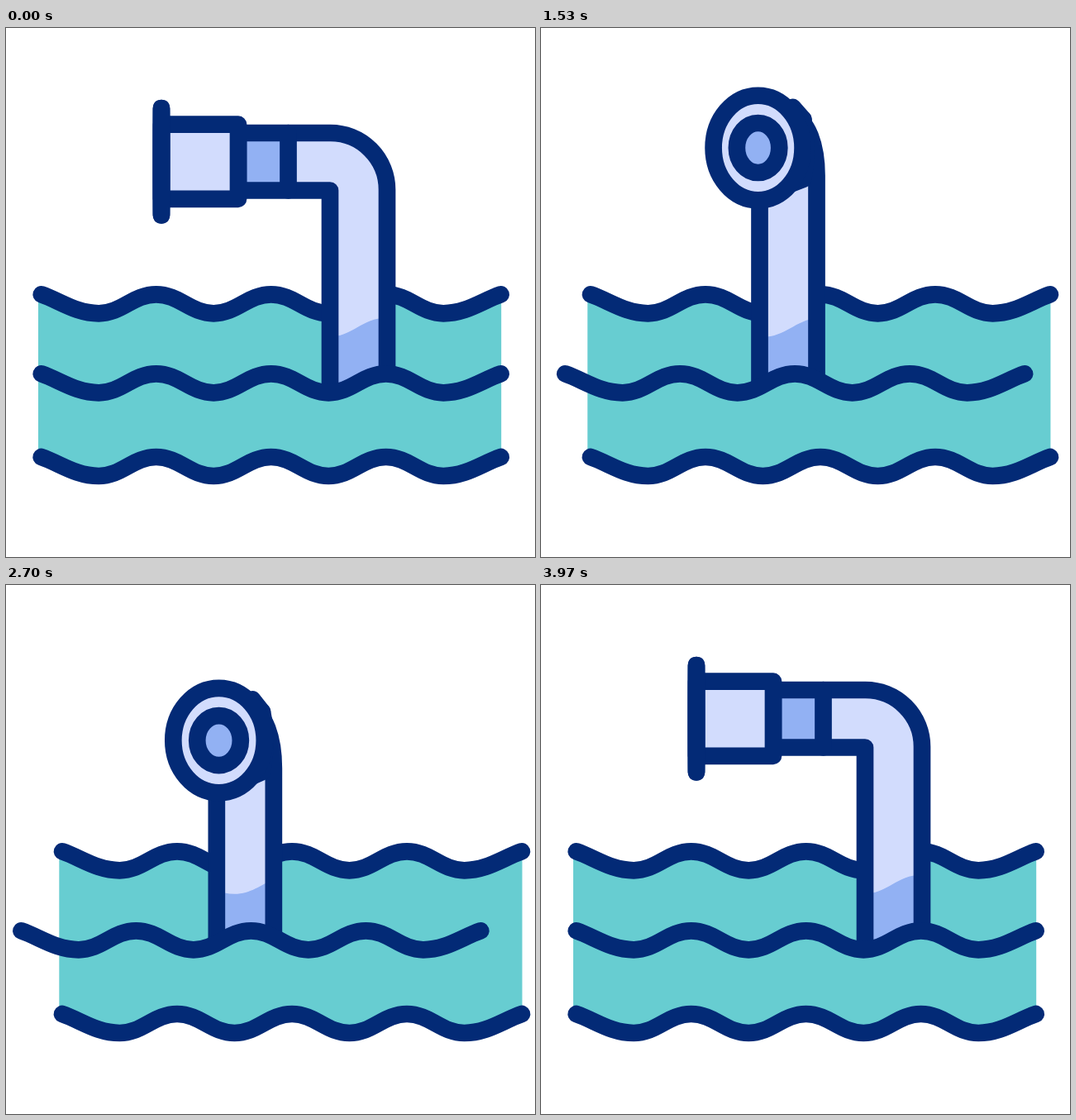
Animation, 640 px wide and 640 px high, one loop 4 s. Source, as an HTML page with a canvas:

```html
<!DOCTYPE html>
<html lang="en">
<head>
<meta charset="utf-8">
<title>Periscope</title>
<style>
  html, body { margin: 0; width: 100%; height: 100%; overflow: hidden; background: #fff; }
  canvas { display: block; width: 640px; height: 640px; }
</style>
</head>
<body>
<canvas id="stage" width="640" height="640"></canvas>
<script>
const ctx = document.getElementById('stage').getContext('2d');
const NAVY = '#032a76', PALE = '#d2dcfd', BLUE = '#92b1f3', TEAL = '#67cdd1';
const LAST = 119;

const smooth = p => p * p * (3 - 2 * p);
const easeOut = p => 1 - (1 - p) ** 2;
const easeIn = p => p ** 2.2;
const mix = (a, b, p) => a + (b - a) * p;

// Each key is [frame, value, easing towards the next key].
function track(keys, f) {
  let i = 0;
  while (i < keys.length - 2 && f >= keys[i + 1][0]) i++;
  const [f0, v0, ease = smooth] = keys[i];
  const [f1, v1] = keys[i + 1];
  const p = Math.min(1, Math.max(0, (f - f0) / (f1 - f0)));
  return mix(v0, v1, ease(p));
}

const BACK = [[0, 0], [20, -13], [40, 25.6], [60, -13], [80, 25.6], [100, -13], [LAST, 0]];
const FRONT = [[0, 0], [20, 27], [40, -24.7], [60, 27], [80, -24.7], [100, 27], [LAST, 0]];
const SCOPE_X = [[0, 0, easeOut], [20, -50.5], [40, -126.8], [80, -138], [100, -22.5, easeIn], [LAST, 0]];
const SCOPE_Y = [[0, 0, easeOut], [20, 19.5], [40, -19.5], [80, 26.7], [100, -19.7, easeIn], [LAST, 0]];
const TURN = [[0, 0], [30, 0], [51, 1], [76.5, 1], [97, 0], [LAST, 0]];

// Appends a wave running right (dir 1) or left (dir -1) from the point x, y.
function wave(path, x, y, dir = 1) {
  const half = 69.5, drop = 23;
  const curve = (a, ya, b, yb, y1) => {
    path.bezierCurveTo(x + dir * a, y + ya, x + dir * b, y + yb, x + dir * half, y + y1);
    x += dir * half;
  };
  curve(23, 8, 42, drop, drop);
  for (let i = 0; i < 3; i++) {
    curve(28, drop, 41.5, 0, 0);
    curve(28, 0, 41.5, drop, drop);
  }
  curve(27.5, drop, 46.5, 8, 0);
}

function waveLine(dx, y) {
  const path = new Path2D();
  path.moveTo(42.7 + dx, y);
  wave(path, 42.7 + dx, y);
  return path;
}

function paint(path, fill, line = true) {
  if (fill) {
    ctx.fillStyle = fill;
    ctx.fill(path);
  }
  if (line) {
    ctx.strokeStyle = NAVY;
    ctx.stroke(path);
  }
}

function water(dx) {
  const body = new Path2D();
  body.moveTo(39 + dx, 322.3);
  body.lineTo(42.7 + dx, 322.3);
  wave(body, 42.7 + dx, 322.3);
  body.lineTo(599.2 + dx, 322.3);
  body.lineTo(599.2 + dx, 519);
  body.lineTo(598.7 + dx, 519);
  wave(body, 598.7 + dx, 519, -1);
  body.lineTo(39 + dx, 519);
  paint(body, TEAL, false);
  paint(waveLine(dx, 322.3));
  paint(waveLine(dx, 519));
}

// A barrel section whose right rim bulges as it turns.
function section(left, top0, bottom0, right, top1, bottom1, bulge, fill) {
  const path = new Path2D();
  path.moveTo(left, top0);
  path.lineTo(right, top1);
  path.quadraticCurveTo(right + bulge, 162, right, bottom1);
  path.lineTo(left, bottom0);
  path.closePath();
  paint(path, fill);
}

function pipe(joint, bend) {
  const path = new Path2D();
  path.moveTo(joint, 127);
  path.lineTo(bend, 127);
  path.ellipse(bend, 195.5, 461 - bend, 68.5, 0, -Math.PI / 2, 0);
  path.lineTo(461, 500);
  path.lineTo(392, 500);
  path.lineTo(392, 196.5);
  path.lineTo(joint, 196.5);
  return path;
}

function ring(x, rx, ry, fill) {
  const path = new Path2D();
  path.ellipse(x, 161.7, Math.max(rx, 0.3), ry, 0, 0, 2 * Math.PI);
  paint(path, fill);
  if (rx < 10.4) {
    const edge = new Path2D();
    edge.moveTo(x, 161.7 - ry);
    edge.lineTo(x, 161.7 + ry);
    paint(edge);
  }
}

function scope(x, y, turn, back) {
  const joint = mix(341.5, 462, turn);
  const rim = mix(281, 457, turn);
  const lens = mix(188, 423.8, turn);
  const tube = pipe(joint, mix(392.5, 441, turn));

  ctx.save();
  ctx.translate(x, y);
  paint(tube, PALE, false);

  ctx.save();
  ctx.clip(tube);
  ctx.translate(-x, -y);
  const tint = waveLine(back, 350.8);
  tint.lineTo(640, 640);
  tint.lineTo(0, 640);
  paint(tint, BLUE, false);
  ctx.restore();

  paint(tube);
  section(rim, mix(127, 110, turn), mix(196.5, 206, turn),
    joint, 127, mix(196.5, 200, turn), 8 * turn, BLUE);
  section(lens, mix(116.7, 98, turn), mix(206.8, 219, turn),
    rim, mix(116.7, 119, turn), mix(206.8, 202, turn), 27 * turn, PALE);
  ring(lens, 63 * turn, mix(64.7, 63, turn), PALE);
  if (turn > 0.5) ring(lens, 30 * turn, 30, BLUE);
  ctx.restore();
}

function draw(now) {
  const f = Math.min(LAST, Math.floor((now % 4000 + 5) * 0.03));
  const back = track(BACK, f), front = track(FRONT, f);

  ctx.fillStyle = '#fff';
  ctx.fillRect(0, 0, 640, 640);
  ctx.lineWidth = 20.7;
  ctx.lineCap = ctx.lineJoin = 'round';

  water(back);

  const above = waveLine(front, 418.3);
  above.lineTo(700, 0);
  above.lineTo(-60, 0);
  ctx.save();
  ctx.clip(above);
  scope(track(SCOPE_X, f), track(SCOPE_Y, f), track(TURN, f), back);
  ctx.restore();

  paint(waveLine(front, 418.3));
}

function tick(now) {
  draw(now);
  requestAnimationFrame(tick);
}
draw(0);
requestAnimationFrame(tick);
</script>
</body>
</html>
```
